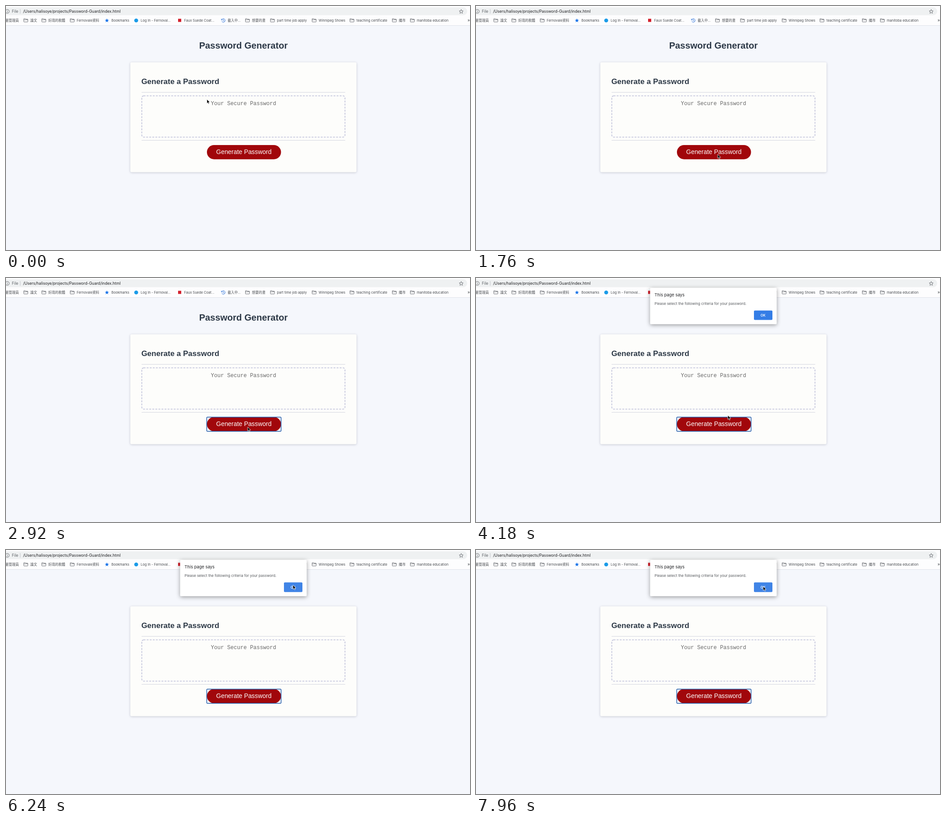
Recreate the animation shown at these times as an HTML page. Size 1030 by 544 pixels, loop 8000 ms.

```html
<!DOCTYPE html>
<html lang="en">
<head>
<meta charset="utf-8">
<title>Password Generator</title>
<style>
  html, body { margin: 0; width: 100%; height: 100%; overflow: hidden; background: #f5f7fc; }
  svg { display: block; width: 100vw; height: 100vh; }
  text { white-space: pre; }
  .ui { font-family: Inter, "Noto Sans CJK TC", "Noto Sans CJK JP", "Noto Sans CJK", sans-serif; }
  .marks { font-size: 7.5px; fill: #494c50; }
  .url { font-size: 8.65px; fill: #202124; }
  .page { font-family: "Liberation Sans", Arial, sans-serif; fill: #2d3947; }
  .bold { font-weight: 700; }
  .mid { text-anchor: middle; }
  .mono { font-family: "Liberation Mono", "Courier New", monospace; font-size: 12.08px; fill: #686868; }
  .line { fill: none; stroke: #5f6368; stroke-width: .9; }
  .card { filter: drop-shadow(0 1px 2.5px rgba(40, 45, 70, .24)); }
  .box { filter: drop-shadow(0 2px 5px rgba(0, 0, 0, .38)); }

  .ring, .dialog, .hover, .cursor { animation: 8s infinite; }
  .ring { animation-name: ring; }
  .dialog { animation-name: dialog; }
  .hover { animation-name: hover; }
  .ring, .dialog, .hover { animation-timing-function: step-end; }
  .cursor { animation-name: move; animation-timing-function: ease-in-out; }

  @keyframes ring { 0% { opacity: 0 } 35.5%, 100% { opacity: 1 } }
  @keyframes dialog { 0% { opacity: 0 } 38.25%, 100% { opacity: 1 } }
  @keyframes hover { 0% { opacity: 0 } 70%, 100% { opacity: 1 } }
  @keyframes move {
    0%, .5% { transform: translate(446px, 208px) }
    10%, 13% { transform: translate(534px, 332px) }
    20%, 33% { transform: translate(536.5px, 330.5px) }
    36%, 43% { transform: translate(536.5px, 332px) }
    46% { transform: translate(540px, 335px) }
    51%, 53.5% { transform: translate(559px, 306px) }
    59%, 63.5% { transform: translate(562px, 317px) }
    72.5%, 80% { transform: translate(637px, 78px) }
    90%, 100% { transform: translate(637.5px, 81px) }
  }
</style>
</head>
<body>
<svg viewBox="0 0 1030 544" preserveAspectRatio="none">
  <defs>
    <path id="folder" class="line" d="M.5 1.2Q.5.5 1.2.5H3.8L4.9 1.7H8.8Q9.5 1.7 9.5 2.4V7.3Q9.5 8 8.8 8H1.2Q.5 8 .5 7.3ZM.5 3.2H9.5"/>
    <path id="star" d="M0-4.6 1.3-1.5 4.5-1.3 2 .8 2.8 4 0 2.3-2.8 4-2 .8-4.5-1.3-1.3-1.5Z"/>
  </defs>

  <rect width="1030" height="544" fill="#f5f7fc"/>

  <!-- browser bars -->
  <rect width="1030" height="43" fill="#fdfdfe"/>
  <path d="M0 43.5H1030" stroke="#dfe2ea"/>
  <path d="M0 3H1015A8.75 8.75 0 0 1 1015 20.5H0Z" fill="#eff1f2"/>
  <circle class="line" cx="3" cy="12" r="4.1"/>
  <path class="line" d="M3 11.3V14.4M3 9.5V10.4"/>
  <path d="M31.5 7V17" stroke="#c3c6ca"/>
  <g class="ui url">
    <text x="13" y="15.2" fill="#5f6368">File</text>
    <text x="38" y="15.2">/Users/halisoye/projects/Password-Guard/index.html</text>
  </g>
  <use href="#star" class="line" x="1010.5" y="12.3"/>

  <!-- bookmarks -->
  <g class="ui marks">
    <text x="-1.6" y="34.6">籤管理員</text>
    <g id="folders"></g>
    <use href="#star" x="224" y="32.3" fill="#1a73e8"/>
    <text x="234" y="34.6">Bookmarks</text>
    <circle cx="289" cy="32.2" r="4.3" fill="#1a9be8"/>
    <text x="299" y="34.6">Log In - Fernoval...</text>
    <rect x="382" y="28.5" width="7" height="7" fill="#d3202c"/>
    <text x="395.5" y="34.6">Faux Suede Coat...</text>
    <path d="M479 30.5A3.9 3.9 0 1 1 479 34M478.2 28.6V31.2H480.8M482.6 29.8V32.5L484.5 33.6" fill="none" stroke="#2a70d8"/>
    <text x="492" y="34.6">載入中...</text>
    <text x="1024.5" y="34.8" font-size="9">»</text>
  </g>

  <!-- page -->
  <text class="page bold mid" x="527" y="94.8" font-size="20.1">Password Generator</text>
  <rect class="card" x="276" y="125.5" width="502" height="245" rx="3" fill="#fdfdfb"/>
  <text class="page bold" x="300.4" y="174" font-size="17">Generate a Password</text>
  <path d="M301 192.5H753M301 299.5H753" stroke="#d4d6e0"/>
  <rect x="301.5" y="200.3" width="451" height="92" rx="4" fill="none" stroke="#b0b2d2" stroke-width="1.3" stroke-dasharray="4.2 2.6"/>
  <text class="mono mid" x="527.3" y="221">Your Secure Password</text>
  <rect x="446" y="310" width="164.5" height="31.7" rx="15.85" fill="#a1070b"/>
  <rect class="ring" x="445.6" y="310.2" width="165" height="31.6" rx="1.5" fill="none" stroke="#1c57a8" stroke-width="1.5"/>
  <text class="page mid" x="528" y="330.4" font-size="13.9" style="fill:#fff">Generate Password</text>

  <!-- alert -->
  <g class="dialog ui">
    <rect class="box" x="386.5" y="22" width="281" height="81" rx="2" fill="#fff"/>
    <text x="396.3" y="41.4" font-size="9.4" fill="#202124">This page says</text>
    <text x="396.3" y="59.5" font-size="8.05" fill="#56595d">Please select the following criteria for your password.</text>
    <rect x="617" y="72.5" width="41" height="21" rx="2" fill="#347de6"/>
    <rect class="hover" x="617" y="72.5" width="41" height="21" rx="2" fill="#4084e6"/>
    <text class="mid" x="637.3" y="85.6" font-size="7.4" font-weight="600" fill="#fff">OK</text>
  </g>

  <path class="cursor" d="M0 0V9.4L2.1 7.4 3.6 10.8 5.1 10.1 3.7 6.8H6.6Z" stroke="#fff" stroke-width=".8"/>
</svg>
<script>
  const ns = "http://www.w3.org/2000/svg";
  const folders = [
    [39, "論文"], [79, "好用的軟體"], [142, "Fernovale資料"], [531, "想要的書"],
    [586.5, "part time job apply"], [679, "Winnipeg Shows"],
    [763, "teaching certificate"], [857, "織市"], [897, "manitoba education"]
  ];
  const row = document.getElementById("folders");

  function add(tag, attrs, label = "") {
    const el = document.createElementNS(ns, tag);
    for (const key in attrs) el.setAttribute(key, attrs[key]);
    el.textContent = label;
    row.append(el);
  }

  for (const [x, label] of folders) {
    add("use", { href: "#folder", x, y: 27.6 });
    add("text", { x: x + 15, y: 34.6 }, label);
  }
</script>
</body>
</html>
```
